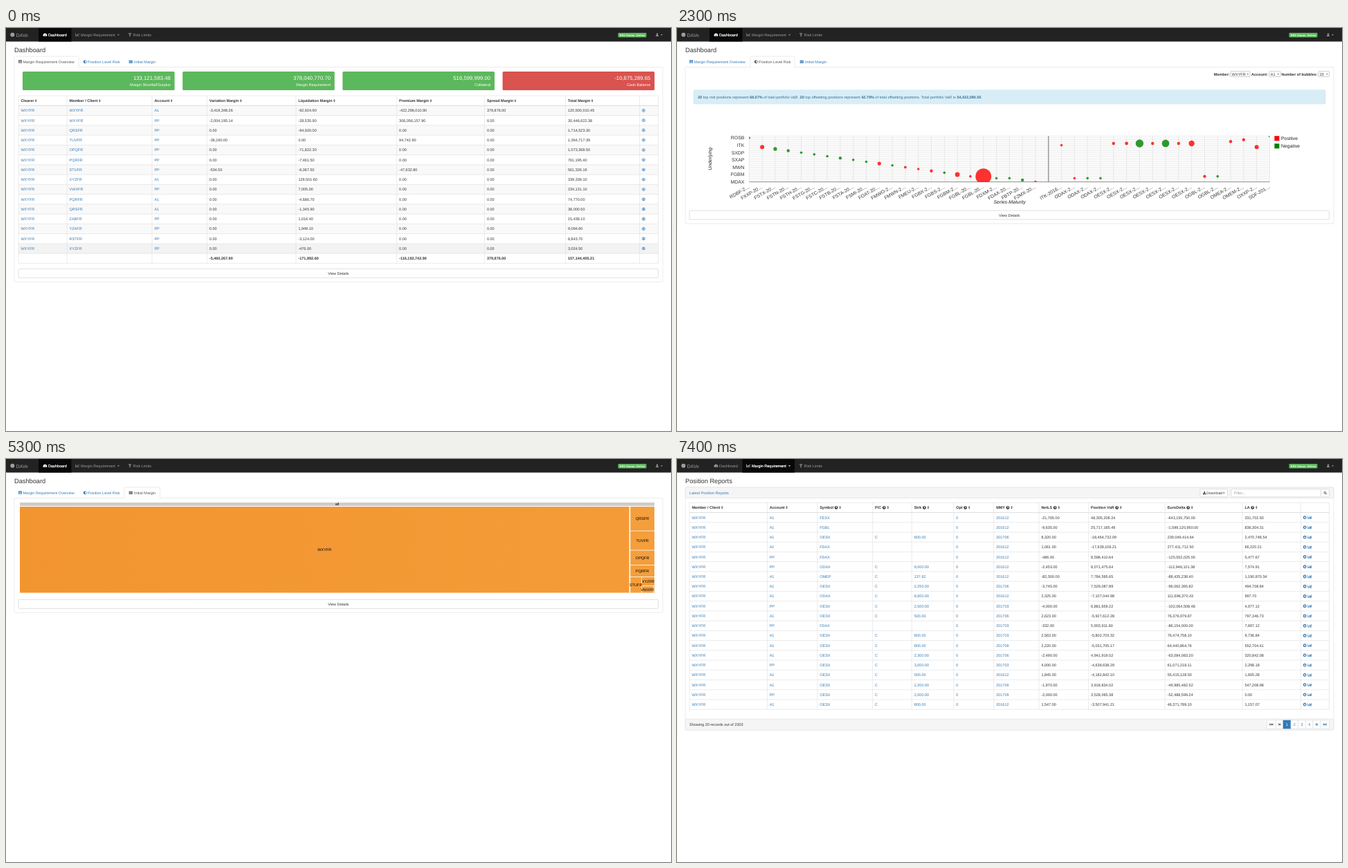
Recreate the animation shown at these times as an HTML page. Size 961 px wide and 583 px high, loop 8 s.

```html
<!DOCTYPE html>
<html lang="en">
<head>
<meta charset="utf-8">
<title>Margin dashboard</title>
<style>
  html, body { margin: 0; width: 100%; height: 100%; overflow: hidden; background: #fff; }
  svg { display: block; width: 961px; height: 583px; }
  text { font: 5.5px "Liberation Sans", Arial, sans-serif; text-rendering: geometricPrecision; white-space: pre; }
</style>
</head>
<body>
<svg id="stage" viewBox="0 0 961 583"></svg>
<script>
const LINK = '#337ab7', DARK = '#333', GREY = '#9d9d9d', LINE = '#ddd', GREEN = '#5cb85c';
const stage = document.getElementById('stage');
let scene = stage;

function add(tag, attrs, parent = scene) {
  const el = document.createElementNS('http://www.w3.org/2000/svg', tag);
  for (const key in attrs) el.setAttribute(key, attrs[key]);
  return parent.appendChild(el);
}

// y is the vertical middle of the line of text
function text(x, y, str, fill = DARK, { size = 5.5, bold, italic, anchor = 'start', ...more } = {}) {
  const el = add('text', { x, y: y + size * .36, fill, 'text-anchor': anchor, ...more });
  el.style.fontSize = size + 'px';
  if (bold) el.style.fontWeight = 'bold';
  if (italic) el.style.fontStyle = 'italic';
  el.textContent = str;
  return el;
}

const box = (x1, y1, x2, y2, fill, stroke = 'none', rx = 0) =>
  add('rect', { x: x1, y: y1, width: x2 - x1, height: y2 - y1, fill, stroke, rx, 'stroke-width': .6 });
const path = (d, stroke = LINE, width = .6) =>
  add('path', { d, stroke, 'stroke-width': width, fill: 'none' });

const ICONS = {
  gauge: 'M-2.7 2A2.9 2.9 0 1 1 2.7 2ZM-.5 1L1-1.2.5 1.3Z',
  chart: 'M-2.9-2.4V2.3H3V1.7H-2.3V-2.4ZM-1.9.8L-.4-.8.6 0 2.5-2 2.9-1.5.6.9-.4.1-1.5 1.3Z',
  limit: 'M-2-2.4H2.2V-1.1H1.7L1.4-1.6H.7V2.4H-.5V-1.6H-1.2L-1.5-1.1H-2Z',
  user: 'M0-2.4A1.2 1.3 0 1 1-.01-2.4ZM-2.2 2.3C-2.2.5-1 .4 0 .4S2.2.5 2.2 2.3Z',
  caret: 'M-1.5-.7H1.5L0 .9Z',
  sort: 'M-1.3-.4L0-2 1.3-.4ZM-1.3.4H1.3L0 2Z',
  table: 'M-2.6-2.2H2.6V2.2H-2.6ZM-2.1-1V-.2H-1V-1ZM-.6-1V-.2H.6V-1ZM1-1V-.2H2.1V-1ZM-2.1.5V1.6H-1V.5ZM-.6.5V1.6H.6V.5ZM1 .5V1.6H2.1V.5Z',
  half: 'M0-2.4A2.4 2.4 0 1 1-.01-2.4ZM0-1.7V1.7A1.7 1.7 0 0 0 0-1.7Z',
  grid: 'M-2.6-2.1H2.6V2.1H-2.6ZM-1.1-2.1V2.1H-.8V-2.1ZM.8-2.1V2.1H1.1V-2.1ZM-2.6-.8V-.5H2.6V-.8ZM-2.6.6V.9H2.6V.6Z',
  down: 'M0-2.4A2.4 2.4 0 1 1-.01-2.4ZM-.5-1.4V-.1H-1.5L0 1.6 1.5-.1H.5V-1.4Z',
  target: 'M0-2.3A2.3 2.3 0 1 1-.01-2.3ZM0-1.6A1.6 1.6 0 1 0 .01-1.6ZM-.5-1H.5V0H1.1L0 1.2-1.1 0H-.5Z',
  help: 'M0-2.4A2.4 2.4 0 1 1-.01-2.4ZM-1.1-.6C-1-2 1.2-2 1.2-.5 1.2.2.4.2.4.8H-.4C-.4-.2.4-.1.4-.6.4-1-.3-1-.3-.6ZM-.4 1.1H.4V1.8H-.4Z',
  bars: 'M-2.8-2.2V2.2H2.8V1.7H-2.3V-2.2ZM-1.8 0H-.9V1.4H-1.8ZM-.5-1.5H.4V1.4H-.5ZM.8-.7H1.6V1.4H.8ZM1.9-1.9H2.7V1.4H1.9Z',
  save: 'M-.6-2.3H.6V-.6H1.7L0 1-1.7-.6H-.6ZM-2.3.8H-1L0 1.6 1 .8H2.3V2.2H-2.3Z',
  search: 'M-.4-2.2A1.8 1.8 0 1 1-.41-2.2ZM-.4-1.5A1.1 1.1 0 1 0-.39-1.5ZM.6 1.1L1.1.6 2.4 1.9 1.9 2.4Z',
  next: 'M-1.5-1.8L.8 0-1.5 1.8ZM.8-1.8H1.5V1.8H.8Z',
  last: 'M-2.5-1.8L-.3-.1V-1.8L1.8 0-.3 1.8V.1L-2.5 1.8ZM1.8-1.8H2.5V1.8H1.8Z'
};
const icon = (name, x, y, fill, flip = '') =>
  add('path', { d: ICONS[name], fill, 'fill-rule': 'evenodd', transform: `translate(${x} ${y}) ${flip}` });

const money = value => Number(value).toLocaleString('en-US', { minimumFractionDigits: 2, maximumFractionDigits: 2 });
const rowsOf = str => str.trim().split('\n').map(line => line.trim().split(' '));

function page(title, active, height) {
  scene = add('g', {}, stage);
  box(0, 0, 961, 19.6, '#222');
  path('M.2 19.6V' + height, '#e8e8e8', .5);
  add('circle', { cx: 9.3, cy: 9.8, r: 3, fill: GREY });
  text(14.6, 10.2, 'DAVe', GREY, { size: 6.93 });
  box(...(active ? [94.5, 0, 170, 19.6] : [47, 0, 94.5, 19.6]), '#080808');
  [['gauge', 56.4, 61, 'Dashboard'], ['chart', 103.2, 108, 'Margin Requirement'], ['limit', 179, 183.5, 'Risk Limits']]
    .forEach(([name, ix, tx, label], i) => {
      const on = i === active, fill = on ? '#fff' : GREY;
      icon(name, ix, 9.8, fill);
      text(tx, 9.8, label, fill, on ? { stroke: '#fff', 'stroke-width': .2 } : {});
    });
  icon('caret', 162.5, 10, active ? '#fff' : GREY);
  box(884.5, 7, 925.5, 13.4, GREEN, 'none', 1);
  text(905, 10.3, 'ERS Status: Online', '#fff', { size: 4, bold: true, anchor: 'middle' });
  icon('user', 941, 9.8, GREY);
  icon('caret', 947.5, 10, GREY);
  text(12, 31.8, title, DARK, { size: 9.24 });
}

function dashboard(active, bottom) {
  page('Dashboard', 0, bottom + 8);
  box(12, 56.6, 949, bottom, '#fff', LINE, 1);
  [['table', 20.5, 24.5, 'Margin Requirement Overview', 12, 105],
   ['half', 114.2, 118, 'Position Level Risk', 106, 170],
   ['grid', 180.3, 185, 'Initial Margin', 171, 222.6]].forEach(([name, ix, tx, label, x1, x2], i) => {
    const fill = i === active ? '#555' : LINK;
    if (i === active) {
      path(`M${x1} 56.6H${x2}`, '#fff', 1);
      path(`M${x1} 56.6V42.5Q${x1} 41 ${x1 + 1.5} 41H${x2 - 1.5}Q${x2} 41 ${x2} 42.5V56.6`);
    }
    icon(name, ix, 48.8, fill);
    text(tx, 48.8, label, fill);
  });
  box(18, bottom - 18.9, 942.5, bottom - 6, '#fff', '#ccc', 1.5);
  text(480.3, bottom - 12.4, 'View Details', DARK, { anchor: 'middle' });
}

// Bordered table: xs holds the column edges, links the number of leading link columns
function table(xs, top, step, heads, rows, links, helpFrom, paint) {
  const left = xs[0], right = xs[xs.length - 1], bottom = top + step * (rows.length + 1);
  rows.forEach((cells, r) => {
    const y = top + step * (r + 1.5);
    const bold = paint(r, y);
    cells.forEach((cell, c) => text(xs[c] + 3.4, y, cell, c < links ? LINK : DARK, { bold }));
  });
  heads.forEach((head, c) => {
    const y = top + step / 2, label = text(xs[c] + 3.4, y, head, DARK, { bold: true });
    let end = xs[c] + 3.4 + label.getComputedTextLength();
    if (c >= helpFrom) {
      icon('help', end + 4, y, DARK);
      end += 6.8;
    }
    icon('sort', end + 2.8, y, DARK);
  });
  let d = '';
  for (let r = 0; r <= rows.length + 1; r++) d += `M${left} ${top + r * step}H${right}`;
  for (const x of xs) d += `M${x} ${top}V${bottom}`;
  path(d);
  path(`M${left} ${top + step}H${right}`, LINE, .8);
}

function overview() {
  dashboard(0, 367.3);
  [['133,121,583.48', 'Margin Shortfall/Surplus'], ['378,040,770.70', 'Margin Requirement'],
   ['516,599,999.00', 'Collateral'], ['-10,875,289.65', 'Cash Balance']].forEach(([value, label], i) => {
    const x = 24 + i * 231.2;
    box(x, 63, x + 219.6, 90, i < 3 ? GREEN : '#d9534f', 'none', 1.5);
    text(x + 213.8, 72.2, value, '#fff', { size: 7.75, anchor: 'end' });
    text(x + 213.8, 81.6, label, '#fff', { anchor: 'end' });
  });
  const rows = rowsOf(`
    WXYFR A1 -3419348.26 -92924.9 -422296010.9 379876 120500010.45
    WXYFR PP -2004195.14 -28535.9 306056157.9 0 30446622.38
    QRSFR PP 0 -94920 0 0 1714523.3
    TUVFR PP -36190 0 94742.9 0 1364717.39
    OPQFR PP 0 -71822.3 0 0 1073368.5
    PQRFR PP 0 -7461.5 0 0 761195.4
    STUFR PP -534.5 -6067.5 -47632.8 0 561326.19
    XYZFR A1 0 129501.6 0 0 339339.1
    VWXFR PP 0 7005 0 0 234131.1
    PQRFR A1 0 -4686.7 0 0 74770
    QRSFR A1 0 -1345.9 0 0 38000.5
    ZABFR PP 0 1016.4 0 0 15438.1
    YZAFR PP 0 1949.1 0 0 9094.6
    RSTFR PP 0 -3124 0 0 8843.7
    XYZFR PP 0 -476 0 0 3024.5`).map(([client, account, ...sums]) => ['WXYFR', client, account, ...sums.map(money)]);
  rows.push(['', '', '', ...[-5460267.9, -171892.6, -116192742.9, 379876, 157144405.21].map(money)]);
  table([18, 88.2, 211, 290.4, 419, 564.7, 691.5, 808.6, 915.6, 942.5], 98, 14.26,
    ['Clearer', 'Member / Client', 'Account', 'Variation Margin', 'Liquidation Margin', 'Premium Margin', 'Spread Margin', 'Total Margin'],
    rows, 3, 99, (r, y) => {
      if (r === 15) return true;
      if (r % 2 === 0) box(18, y - 7.13, 942.5, y + 7.13, r === 14 ? '#f3f3f3' : '#f9f9f9');
      icon('target', 921.4, y, LINK);
    });
}

function bubbleChart() {
  dashboard(1, 283);
  [['Member:', 775.7, 'WXYFR', 800, 828], ['Account:', 830, 'A1', 856, 872], ['Number of bubbles:', 873.5, '20', 927, 942.5]]
    .forEach(([label, x, value, x1, x2]) => {
      text(x, 66.6, label, DARK, { bold: true });
      box(x1, 62.8, x2, 70.4, '#fff', '#aaa', .5);
      text(x1 + 1.8, 66.6, value);
      icon('caret', x2 - 3.2, 66.6, DARK, 'scale(.8)');
    });

  box(24, 89.8, 937, 109.8, '#d9edf7', '#bce8f1', 1.5);
  const note = text(30, 99.8, '', '#31708f');
  ['20', ' top risk positions represent ', '68.07%', ' of total portfolio VaR. ', '20',
   ' top offsetting positions represent ', '42.79%', ' of total offsetting positions. Total portfolio VaR is ', '54,432,090.55']
    .forEach((part, i) => {
      add('tspan', { 'font-weight': i % 2 ? 'normal' : 'bold' }, note).textContent = part;
    });

  const left = 104.3, right = 856.5, base = 222.6;
  const px = i => left + i * 18.805, py = level => base - level * 2.65;
  let d = '';
  for (let i = 0; i <= 40; i++) d += `M${px(i)} 156.3V${base}`;
  for (let k = 0; k <= 25; k++) d += `M${left} ${py(k)}H${right}`;
  path(d, '#d6d6d6', .5);
  path(`M${px(23)} 156.3V${base}`, '#555', .8);
  path(`M${left} ${base}H${right}`, '#777', .8);

  add('rect', { x: left, y: 156.3, width: right - left, height: base - 156.1 }, add('clipPath', { id: 'plot' }));
  const dots = add('g', { 'clip-path': 'url(#plot)', 'fill-opacity': .8 });
  // series, colour, level, radius
  rowsOf(`
    RDBF-2 g 24 1.8
    FXXP-20 r 19 3
    FSTX-20 g 18 2.6
    FSTN-20 g 17 2.2
    FSTH-20 g 16 1.8
    FSTG-20 g 15 1.8
    FSTC-20 g 14 1.8
    FSTB-20 g 13 2.2
    FSTA-20 g 12 1.8
    FSMI-20 g 11 1.8
    FOAT-20 r 10 2.6
    FMWO-2 g 9 1.8
    FMWN-2 r 8 1.9
    FMEU-2 r 7 1.8
    FGBX-2 r 6 2.2
    FGBS-2 g 5 1.8
    FGBM-2 r 4 3.4
    FGBL-20 r 3 1.8
    FGBL-20 r 3 11.4
    FDXM-2 g 2 1.8
    FDAX-20 g 2 1.8
    FBTP-20 g 1 2.2
    F2MX-20 r 0 1.8
    -
    ITK-2016 r 20 1.8
    ODAX-2 r 2 1.8
    ODAX-2 g 2 1.8
    ODAX-2 g 2 1.8
    OESX-2 r 21 2.2
    OESX-2 r 21 2.4
    OESX-2 g 21 5.7
    OESX-2 r 21 2.2
    OESX-2 g 21 5.4
    OESX-2 r 21 2.2
    OESX-2 r 21 4.2
    OGBL-2 r 3 2.2
    OGBL-2 g 3 1.8
    OMEA-2 r 22 2.2
    OMEM-2 r 23 2.2
    OXXP-2 r 19 3
    SDF-201 g 25 1.8`).forEach(([series, colour, level, r], i) => {
    if (!colour) return;
    add('circle', { cx: px(i), cy: py(level), r, fill: colour === 'r' ? 'red' : 'green' }, dots);
    text(0, -2.4, series + '…', DARK, { size: 6.9, anchor: 'end', transform: `translate(${px(i) + 1} 231) rotate(-30)` });
  });

  ['MDAX', 'FGBM', 'MWN', 'SXAP', 'SXDP', 'ITK', 'ROSB'].forEach((name, i) =>
    text(97.4, py(i * 4), name, DARK, { size: 6.9, anchor: 'end' }));
  text(0, 0, 'Underlying', '#222', { size: 6.9, italic: true, anchor: 'middle', transform: 'translate(47.5 189.3) rotate(-90)' });
  text(480.7, 251.6, 'Series-Maturity', '#222', { size: 6.9, italic: true, anchor: 'middle' });
  [['Positive', 'red'], ['Negative', 'green']].forEach(([label, fill], i) => {
    const y = 156.2 + i * 11.1;
    box(863.4, y, 870.4, y + 7, fill);
    text(873, y + 3.5, label, '#222', { size: 6.9 });
  });
}

function treemap() {
  dashboard(2, 222.3);
  const shade = add('linearGradient', { id: 'shade' });
  add('stop', { offset: 0, 'stop-color': '#f2952f' }, shade);
  add('stop', { offset: 1, 'stop-color': '#f49b38' }, shade);
  box(20, 63, 937, 67.9, '#ccc');
  text(478.5, 65.5, 'all', '#000', { anchor: 'middle' });
  [['WXYFR', 20, 69, 900.6, 193.5], ['QRSFR', 902.3, 69, 937, 103.6], ['TUVFR', 902.3, 104.4, 937, 131.6],
   ['OPQFR', 902.3, 132.4, 937, 153.2], ['PQRFR', 902.3, 154, 937, 170], ['STUFR', 902.3, 170.8, 918.2, 193.5],
   ['XYZFR', 919, 170.8, 937, 183.2], ['VWXFR', 919, 184, 935.2, 193.5], ['', 935.8, 184, 937, 193.5]]
    .forEach(([name, x1, y1, x2, y2], i) => {
      box(x1, y1, x2, y2, i ? '#f49e3c' : 'url(#shade)');
      text((x1 + x2) / 2, (y1 + y2) / 2, name, '#000', { anchor: 'middle' });
    });
}

function reports() {
  page('Position Reports', 1, 400);
  box(12, 41, 949, 392, '#fff', LINE, 1.5);
  box(12, 41, 949, 56.6, '#f5f5f5', LINE, 1.5);
  text(18, 48.8, 'Latest Position Reports', LINK);
  box(756, 43.4, 795.5, 54.8, '#fff', '#ccc', 1.2);
  icon('save', 762.2, 49, DARK);
  text(765.2, 49, 'Download', DARK, { size: 5.2 });
  icon('caret', 790.2, 49.2, DARK, 'scale(.9)');
  box(801, 43.4, 930.6, 54.8, '#fff', '#ccc', 1.2);
  text(805, 49, 'Filter...', '#999');
  box(930.6, 43.4, 942.5, 54.8, '#fff', '#ccc', 1.2);
  icon('search', 936.8, 49.1, DARK);

  // account, symbol, strike, maturity, net position, VaR, delta, liquidity
  const rows = rowsOf(`
    A1 FESX - 201612 -21765 48305208.24 -643155750 331702.5
    A1 FGBL - 201612 -9635 25717165.49 -1599120950 836304.31
    A1 OESX 800 201706 8320 -18464732.09 239049414.64 2470748.54
    A1 FDAX - 201612 1061 -17639106.21 277411712.5 66220.21
    PP FDAX - 201612 -486 8598410.64 -125552025 5477.67
    PP ODAX 9000 201612 -2453 8071475.64 -112946101.38 7574.91
    A1 OMEP 137.62 201612 -82300 7784595.65 -88435238.4 1190870.34
    A1 OESX 2250 201706 -3745 7529087.89 -96062365.82 494708.84
    A1 ODAX 8600 201612 2325 -7107044.98 111696370.43 997.7
    PP OESX 2500 201703 -4000 6881659.22 -102064508.48 4977.12
    A1 OESX 500 201706 2623 -5927612.28 76376979.87 797346.73
    PP FDAX - 201703 -332 5903911.6 -86154000 7697.12
    A1 OESX 800 201703 2563 -5802703.32 76474758.1 9736.84
    A1 OESX 800 201709 2220 -5031705.17 64440864.76 552704.41
    A1 OESX 2300 201706 -2490 4941919.52 -63084083.2 320842.08
    PP OESX 3000 201703 4000 -4638638.29 61071218.11 2298.18
    A1 OESX 500 201612 1845 -4182842.1 55415128.5 1605.28
    A1 OESX 2200 201709 -1970 3918834.02 -49985482.52 547208.98
    PP OESX 2000 201709 -2000 3528065.38 -52488599.24 0
    A1 OESX 800 201612 1547 -3507941.21 46371789.1 1157.07`).map(([account, symbol, strike, month, ...sums]) => {
    const option = strike !== '-';
    return ['WXYFR', account, symbol, option ? 'C' : '', option ? money(strike) : '', '0', month, ...sums.map(money)];
  });
  table([18, 130.3, 202.8, 282.7, 339.3, 399.8, 457.8, 523, 594.7, 705.3, 817, 901.5, 942.5], 63.2, 14.24,
    ['Member / Client', 'Account', 'Symbol', 'P/C', 'Strk', 'Opt', 'MMY', 'NetLS', 'Position VaR', 'EuroDelta', 'LA'],
    rows, 7, 2, (r, y) => {
      icon('down', 907.2, y, LINK);
      icon('bars', 914.2, y, LINK);
    });

  box(12, 376, 949, 392, '#f5f5f5', LINE, 1.5);
  text(18, 384, 'Showing 20 records out of 2303');
  const edges = [852.5, 865.2, 876, 887, 897.6, 908.4, 919, 930, 942.5];
  ['last', 'next', '1', '2', '3', '4', 'next', 'last'].forEach((label, i) => {
    const on = label === '1', mid = (edges[i] + edges[i + 1]) / 2;
    box(edges[i], 378, edges[i + 1], 390, on ? LINK : '#fff', on ? LINK : LINE);
    if (ICONS[label]) icon(label, mid, 384, i < 2 ? '#555' : LINK, i < 2 ? 'scale(-1 1)' : '');
    else text(mid, 384, label, on ? '#fff' : LINK, { anchor: 'middle' });
  });
}

const scenes = [overview, bubbleChart, treemap, reports].map(build => (build(), scene));
const starts = [0, 500, 3500, 6500], LOOP = 8000;
const origin = performance.now();

function tick() {
  const t = (performance.now() - origin) % LOOP;
  const current = starts.filter(start => start <= t).length - 1;
  scenes.forEach((g, i) => g.setAttribute('display', i === current ? 'inline' : 'none'));
  requestAnimationFrame(tick);
}
tick();
</script>
</body>
</html>
```
